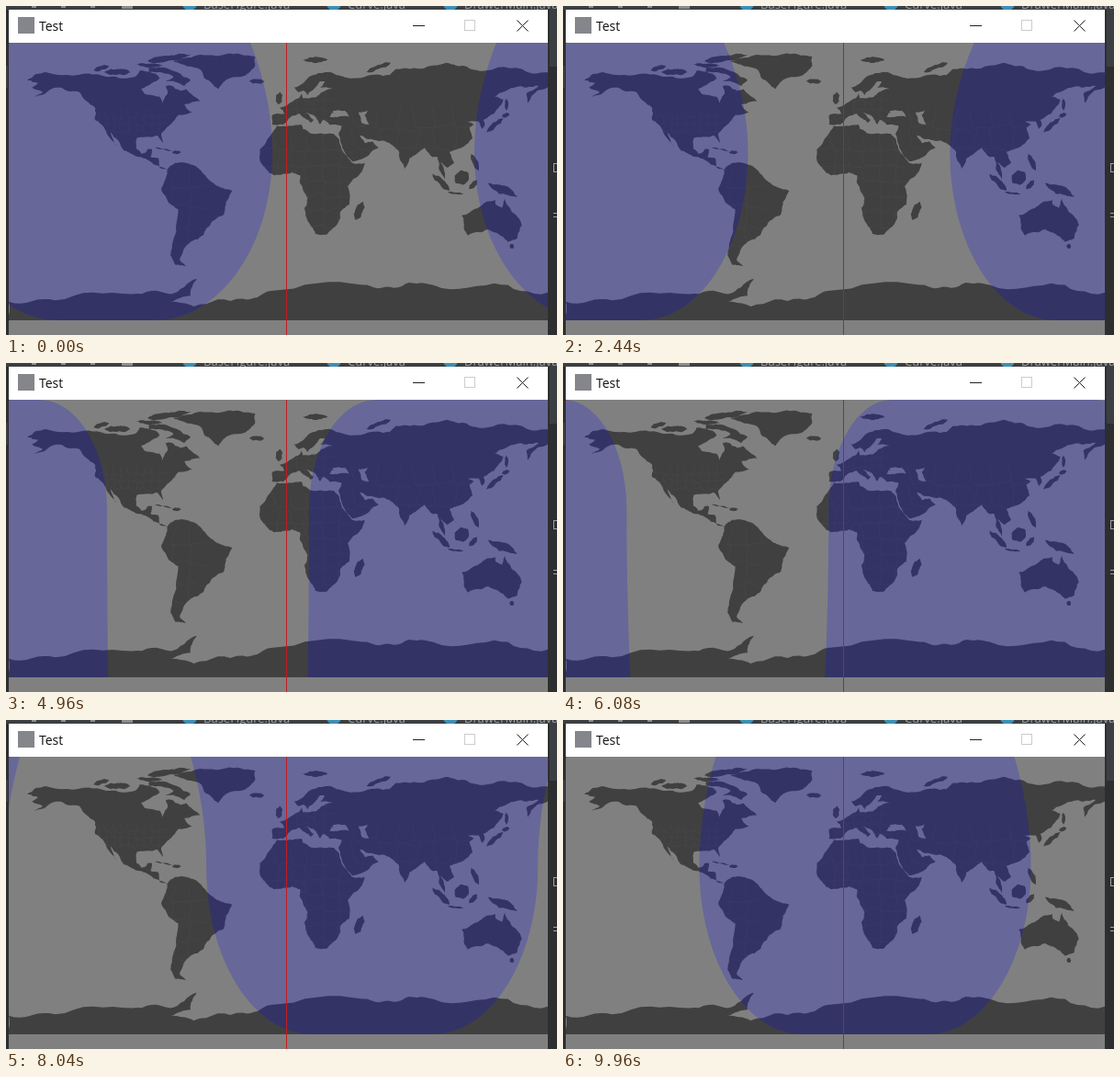
Write an HTML page with a canvas that moves like this. It is 600 by 358 pixels and loops after 10 s.

```html
<!DOCTYPE html>
<html>
<head>
<meta charset="utf-8">
<style>
  html, body { margin: 0; width: 100%; height: 100%; overflow: hidden; background: #2d2e30; }
  canvas { display: block; }
</style>
</head>
<body>
<canvas id="stage" width="600" height="358"></canvas>
<script>
const ctx = document.getElementById('stage').getContext('2d');
const MAP = { left: 3, top: 40, width: 587, height: 302, scale: 604 / 360 };
const OCEAN = '#808080', LAND = '#404040', RED = '#c01c1c';

let seed = 7;
const random = () => (seed = seed * 16807 % 2147483647) / 2147483647 - 0.5;

// Coast between two points, roughened by midpoint displacement
function coast(path, x1, y1, x2, y2, depth) {
  if (!depth) return path.lineTo(x2, y2);
  const push = random() * 0.2;
  const x = (x1 + x2) / 2 + (y2 - y1) * push;
  const y = (y1 + y2) / 2 - (x2 - x1) * push;
  coast(path, x1, y1, x, y, depth - 1);
  coast(path, x, y, x2, y2, depth - 1);
}

const land = new Path2D();
const seas = new Path2D();

// Corners are longitude, latitude pairs
function shape(path, ...c) {
  path.moveTo(c[0], c[1]);
  for (let i = 0; i < c.length; i += 2) {
    const j = (i + 2) % c.length;
    coast(path, c[i], c[i + 1], c[j], c[j + 1], 3);
  }
  path.closePath();
}

// Slim island from end to end
function isle(x1, y1, x2, y2, width) {
  const length = Math.hypot(x2 - x1, y2 - y1);
  const dx = (y2 - y1) / length * width / 2, dy = (x1 - x2) / length * width / 2;
  const mix = k => [x1 + (x2 - x1) * k, y1 + (y2 - y1) * k];
  const [ax, ay] = mix(0.25), [bx, by] = mix(0.75);
  shape(land, x1, y1, ax + dx, ay + dy, bx + dx, by + dy, x2, y2, bx - dx, by - dy, ax - dx, ay - dy);
}

// North America
shape(land, -168, 66, -156, 71, -128, 70, -115, 68, -98, 68, -95, 72, -85, 70, -82, 67, -87, 64,
  -94, 60, -92, 57, -82, 55, -80, 51, -79, 54, -77, 57, -78, 62, -74, 62, -69, 59, -65, 60, -56, 52,
  -66, 50, -65, 48, -61, 45, -70, 43, -76, 36, -81, 31, -80, 25, -84, 30, -91, 29, -97, 28, -97, 21,
  -94, 18, -91, 19, -90, 21, -87, 21, -88, 16, -83, 15, -82, 9, -77, 8, -86, 11, -95, 16, -105, 20,
  -114, 32, -110, 23, -117, 33, -124, 40, -124, 48, -134, 58, -146, 61, -154, 59, -164, 55, -158, 58,
  -165, 61, -161, 64);
// South America
shape(land, -77, 8, -72, 12, -62, 11, -50, 1, -44, -3, -35, -6, -39, -13, -41, -22, -48, -26, -54, -35,
  -62, -39, -65, -42, -67, -46, -69, -51, -65, -55, -72, -54, -75, -48, -73, -37, -70, -18, -76, -14,
  -81, -5, -78, 2);
// Africa
shape(land, -6, 36, 10, 37, 11, 34, 20, 31, 31, 31, 34, 28, 38, 18, 43, 12, 51, 12, 48, 5, 40, -3,
  41, -15, 35, -20, 35, -24, 32, -29, 27, -34, 19, -34, 15, -27, 12, -17, 14, -11, 9, -1, 9, 4, 4, 6,
  -8, 4, -13, 8, -17, 14, -17, 21, -10, 30);
// Europe
shape(land, -9, 43, -9, 37, -2, 37, 3, 42, 9, 44, 16, 38, 18, 40, 13, 45, 19, 42, 22, 37, 24, 40,
  28, 37, 36, 36, 60, 36, 62, 69, 44, 67, 33, 69, 27, 71, 15, 68, 5, 61, 8, 58, 11, 59, 14, 56,
  18, 60, 22, 65, 25, 65, 22, 61, 30, 60, 23, 58, 20, 55, 11, 54, 10, 57, 8, 54, -4, 48, -1, 44);
// Asia
shape(land, 36, 37, 34, 31, 35, 28, 43, 13, 52, 16, 60, 22, 56, 26, 51, 25, 48, 30, 57, 27, 67, 25,
  73, 20, 77, 8, 80, 15, 90, 22, 95, 16, 98, 16, 99, 9, 103, 1, 100, 13, 105, 9, 109, 12, 106, 19,
  114, 22, 121, 28, 119, 35, 122, 37, 118, 39, 125, 39, 127, 34, 129, 37, 128, 40, 135, 44, 141, 53,
  135, 55, 143, 59, 156, 61, 164, 62, 156, 57, 157, 51, 163, 59, 179, 62, 180, 69, 160, 70, 130, 72,
  113, 75, 104, 77, 80, 73, 72, 73, 67, 69, 58, 69, 50, 40);
// Australia
shape(land, 114, -22, 116, -32, 118, -35, 131, -31, 138, -34, 144, -39, 150, -37, 153, -28, 146, -19,
  142, -11, 140, -17, 136, -15, 136, -12, 130, -13, 122, -18);
// Antarctica
shape(land, -180, -78, -150, -77, -100, -73, -75, -73, -58, -63, -62, -74, -75, -78, -60, -81, -28, -76,
  -10, -71, 50, -67, 70, -69, 90, -66, 135, -66, 170, -72, 180, -78, 180, -95, -180, -95);
// Greenland
shape(land, -73, 78, -50, 82, -32, 83, -20, 81, -20, 75, -26, 69, -40, 65, -44, 60, -53, 67, -55, 72, -67, 76);
// Baffin Island
shape(land, -62, 66, -66, 62, -78, 65, -73, 68, -89, 71, -89, 74, -80, 74);
// New Guinea
shape(land, 131, -1, 138, -2, 145, -4, 150, -10, 138, -8, 133, -4);

isle(-90, 78, -62, 82, 4);
isle(-118, 71, -101, 71, 4);
isle(-125, 72, -115, 75, 3);
isle(-97, 76, -80, 75, 2);
isle(-24, 65, -14, 65, 3);
isle(11, 79, 27, 79, 3);
isle(52, 71, 68, 77, 3);
isle(-5, 50, -4, 58, 4);
isle(-85, 22, -74, 20, 1);
isle(-74, 19, -68, 19, 2);
isle(45, -25, 50, -13, 5);
isle(95, 5, 106, -6, 4);
isle(105, -7, 115, -8, 1.5);
isle(110, -1, 118, 6, 8);
isle(119, -5, 124, 1, 3);
isle(120, 18, 125, 7, 3);
isle(130, 32, 141, 41, 3);
isle(140, 42, 145, 44, 2.5);
isle(143, 46, 143, 54, 2);
isle(145, -42, 148, -42, 3);

// Caspian and Black Sea
shape(seas, 47, 45, 53, 46, 51, 43, 54, 37, 49, 38);
shape(seas, 28, 42, 31, 46, 38, 46, 41, 42, 34, 42);

// Wavering lines over a region, seen only on land
const borders = new Path2D();
function addBorders(west, south, east, north, step) {
  const wave = () => random() * step * 0.7;
  for (let x = west; x <= east; x += step) {
    for (let y = south; y <= north; y += step) {
      borders.moveTo(x + step, y + wave());
      borders.lineTo(x, y);
      borders.lineTo(x + wave(), y + step);
    }
  }
}
addBorders(-122, 32, -78, 44, 5);
addBorders(-16, -30, 40, 28, 10);
addBorders(-5, 40, 30, 52, 6);
addBorders(45, 22, 110, 45, 13);
addBorders(-75, -40, -55, 0, 12);

// Half-width of daylight at the top and bottom of the map: time, top, bottom
const poses = [
  [0, 134, 238], [3140, 137, 222],
  [3140, 191, 113], [6500, 177, 105],
  [6500, 177, 234], [7200, 170, 232], [8880, 16, 217], [9960, 128, 222], [10000, 132, 222]
];

function rect(color, x, y, w, h) {
  ctx.fillStyle = color;
  ctx.fillRect(x, y, w, h);
}

function text(str, x, y, size, color) {
  ctx.fillStyle = color;
  ctx.font = size + 'px "Open Sans", sans-serif';
  ctx.fillText(str, x, y);
}

function drawDesktop() {
  rect('#2d2e30', 0, 0, 600, 358);
  rect('#3c3f41', 0, 0, 600, 4);
  rect('#3c3f41', 0, 65, 2, 24);
  rect('#3c3f41', 592, 0, 8, 66);
  [[200, 'BaseFigure.java'], [357, 'Curve.java'], [484, 'DrawerMain.java']].forEach(([x, name]) => {
    ctx.fillStyle = '#3e8fb5';
    ctx.beginPath();
    ctx.arc(x, -3, 8, 0, 7);
    ctx.fill();
    text(name, x + 15, 3, 13, '#a0a3a5');
  });
  [28, 60, 92].forEach(x => rect('#8a8c8e', x, 0, 5, 2));
  rect('#8a8c8e', 126, 0, 12, 3);
  ctx.strokeStyle = '#a0a3a5';
  ctx.lineWidth = 1;
  ctx.strokeRect(596.5, 171.5, 8, 9);
  rect('#a0a3a5', 596, 225, 4, 1);
  rect('#a0a3a5', 596, 229, 4, 1);
}

function drawTitleBar() {
  rect('#fff', 3, 4, 587, 36);
  rect('#85868c', 13, 12, 18, 18);
  text('Test', 36, 27, 14, '#111');
  rect('#222', 443, 21, 13, 1);
  ctx.lineWidth = 1;
  ctx.strokeStyle = '#ccc';
  ctx.strokeRect(499.5, 15.5, 11, 11);
  ctx.strokeStyle = '#222';
  ctx.stroke(new Path2D('M556.5 15.5l12 12m0-12l-12 12'));
}

function clipToMap() {
  ctx.beginPath();
  ctx.rect(MAP.left, MAP.top, MAP.width, MAP.height);
  ctx.clip();
}

function drawMap() {
  rect(OCEAN, MAP.left, MAP.top, MAP.width, 358 - MAP.top);
  ctx.save();
  clipToMap();
  ctx.translate(305, 191);
  ctx.scale(MAP.scale, -MAP.scale);
  ctx.fillStyle = LAND;
  ctx.fill(land);
  ctx.fillStyle = OCEAN;
  ctx.fill(seas);
  ctx.clip(land);
  ctx.strokeStyle = '#494949';
  ctx.lineWidth = 0.35;
  ctx.stroke(borders);
  ctx.restore();
}

function drawNight(ms) {
  const i = poses.findIndex(p => p[0] > ms);
  const [a, b] = [poses[i - 1], poses[i]];
  const k = (ms - a[0]) / (b[0] - a[0]);
  const [top, bottom] = [1, 2].map(n => a[n] + (b[n] - a[n]) * k);
  const center = 400 - 0.0363 * ms;
  const waist = 160, half = 110, period = 581, end = MAP.top + MAP.height;

  const halfAt = y => {
    const upper = y < waist;
    const u = (y - waist) / (upper ? MAP.top - waist : end - waist);
    const spread = (upper ? top : bottom) - half;
    const power = Math.abs(spread) < 30 ? 1 : 0.5;
    return half + spread * (1 - (1 - u * u) ** power);
  };

  ctx.save();
  clipToMap();
  ctx.beginPath();
  ctx.rect(MAP.left, MAP.top, MAP.width, MAP.height);
  for (const x of [center - period, center, center + period]) {
    ctx.moveTo(x, MAP.top);
    for (let y = MAP.top; y <= end; y++) ctx.lineTo(x + halfAt(y), y);
    for (let y = end; y >= MAP.top; y--) ctx.lineTo(x - halfAt(y), y);
    ctx.closePath();
  }
  ctx.fillStyle = 'rgba(0,0,255,.2)';
  ctx.fill('evenodd');
  ctx.restore();
}

function draw(now) {
  const ms = Math.floor(now % 10000 / 40) * 40;
  drawDesktop();
  drawMap();
  drawNight(ms);
  drawTitleBar();
  rect(RED, 305, 40, 1, 318);
  rect(RED, 3, 40, 1, 1);
  requestAnimationFrame(draw);
}
requestAnimationFrame(draw);
</script>
</body>
</html>
```
